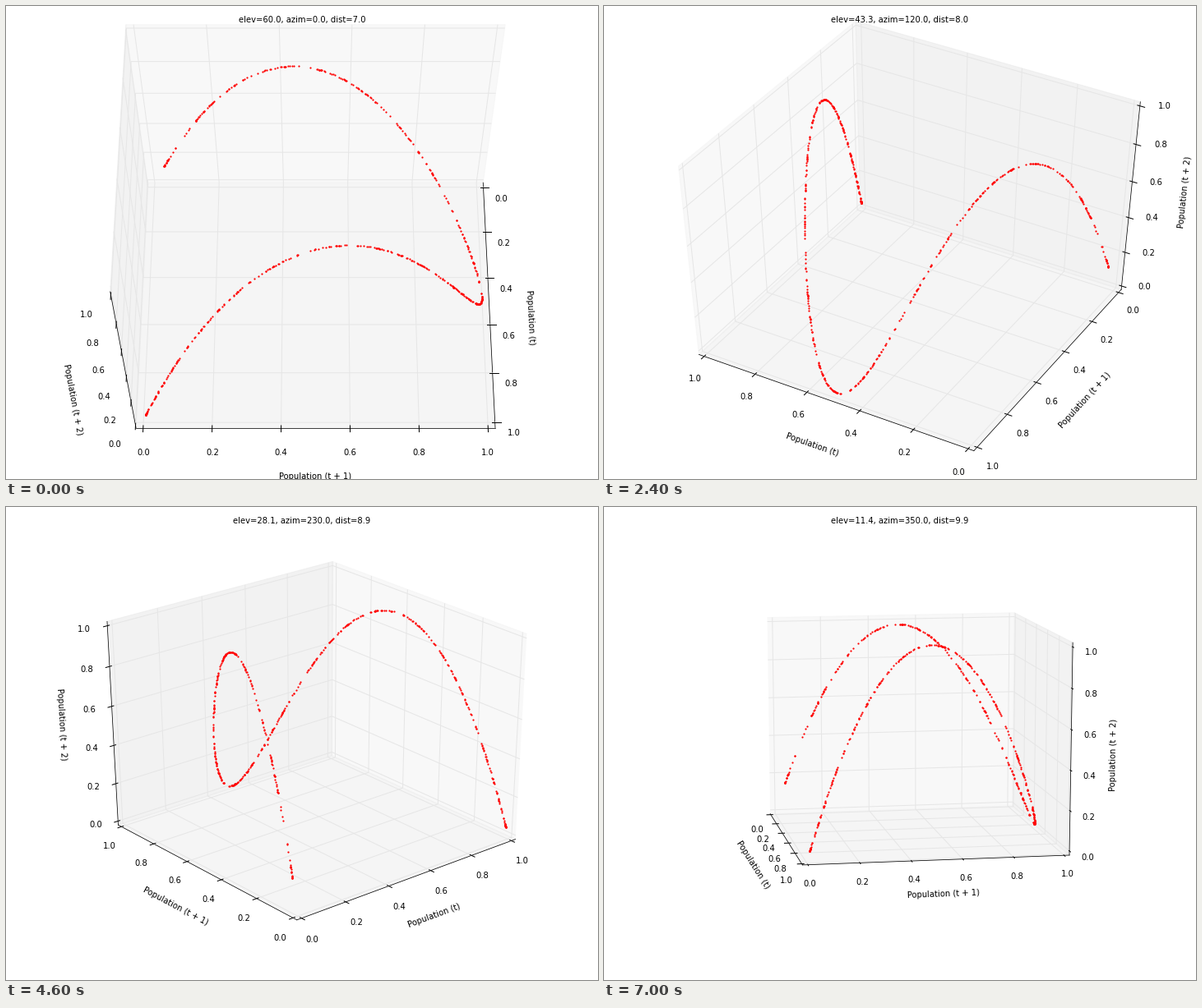
Write a matplotlib script that moves like this. It is 720x576 px and loops after 7200 ms.

```python
import numpy as np
import matplotlib.pyplot as plt
from matplotlib.animation import FuncAnimation
from matplotlib.collections import LineCollection
from matplotlib.patches import Polygon

FRAMES = 36
RATE = 3.99
POINTS = 500
TICKS = np.linspace(0, 1, 6)
STEP = 1 / 12                       # base unit for margins, ticks and label gaps
LOW, HIGH = -STEP / 4, 1 + STEP / 4
PANE_GREYS = (0.95, 0.90, 0.925)
NAMES = ("Population (t)", "Population (t + 1)", "Population (t + 2)")
TICK_DIRS = (1, 0, 0)
# axis flipped to the near side, for the x, y and z axis lines
NEAR_AXES = (1, 0, 0)

plt.rcParams.update({"font.family": "DejaVu Sans", "font.size": 10})


def logistic_orbit(count, rate, start=0.5):
    pops = [start]
    while len(pops) < count + 2:
        pops.append(pops[-1] * rate * (1 - pops[-1]))
    return np.column_stack([pops[:-2], pops[1:-1], pops[2:]])


class Camera:
    def __init__(self, elev, azim, dist):
        el, az = np.radians([elev, azim])
        self.dist = dist
        self.normal = np.array([np.cos(az) * np.cos(el),
                                np.sin(az) * np.cos(el), np.sin(el)])
        self.right = np.array([-np.sin(az), np.cos(az), 0])
        self.up = np.cross(self.normal, self.right)

    def project(self, points):
        rel = np.asarray(points, float) - 0.5
        depth = self.dist - rel @ self.normal
        return np.stack([rel @ self.right, rel @ self.up], -1) / depth[..., None]

    def far_corner(self):
        return np.where(self.normal < -1e-9, HIGH, LOW)


def flipped(point, i):
    out = point.copy()
    out[i] = LOW + HIGH - out[i]
    return out


def placed(point, i, value):
    out = point.copy()
    out[i] = value
    return out


def away_from_center(point, gap, axis):
    out = point + np.where(point < 0.5, -gap, gap)
    out[axis] = point[axis]
    return out


def upright(angle):
    angle = (angle + 180) % 180
    return angle - 180 if angle > 90 else angle


def draw_pane(cam, axis, far):
    a, b = [i for i in range(3) if i != axis]
    corners = np.empty((4, 3))
    corners[:, axis] = far[axis]
    corners[:, a] = LOW, HIGH, HIGH, LOW
    corners[:, b] = LOW, LOW, HIGH, HIGH
    grey = (PANE_GREYS[axis],) * 3
    ax.add_patch(Polygon(cam.project(corners), closed=False, facecolor=grey,
                         edgecolor=grey, alpha=0.5, lw=1, zorder=1,
                         clip_on=False))


def draw_line(ends, width, z):
    ax.plot(*ends.T, color="black", lw=width, zorder=z, clip_on=False)


def draw_axis(cam, axis, far):
    z = 2 + axis
    start = flipped(far, NEAR_AXES[axis])
    stop = flipped(start, axis)
    ends = cam.project([start, stop])
    draw_line(ends, 0.75, z)

    # axis title, turned along the axis line
    dx, dy = ax.transData.transform(ends[1]) - ax.transData.transform(ends[0])
    spot = away_from_center((start + stop) / 2, 1.6 * STEP, axis)
    ax.text(*cam.project(spot), NAMES[axis], ha="center", va="center",
            rotation=upright(np.degrees(np.arctan2(dy, dx))), zorder=z)

    grid = []
    for value in TICKS:
        bend = placed(far, axis, value)
        grid.append(cam.project([flipped(bend, (axis + 1) % 3), bend,
                                 flipped(bend, (axis + 2) % 3)]))
    ax.add_collection(LineCollection(grid, colors=[(0.9, 0.9, 0.9)],
                                     linewidths=1, zorder=z + 0.1,
                                     clip_on=False), autolim=False)

    side = TICK_DIRS[axis]
    sign = 1 if far[side] == HIGH else -1
    for value in TICKS:
        base = placed(start, axis, value)
        tick = [placed(base, side, base[side] + f * sign * STEP)
                for f in (0.1, -0.2)]
        draw_line(cam.project(tick), 1, z + 0.2)
        spot = away_from_center(base, 0.7 * STEP, axis)
        ax.text(*cam.project(spot), f"{value:.1f}", ha="center", va="top",
                zorder=z + 0.2)


def draw(frame):
    turn = frame / FRAMES
    elev, azim, dist = 60 - 50 * turn, 360 * turn, 7 + 3 * turn
    cam = Camera(elev, azim, dist)
    far = cam.far_corner()

    ax.cla()
    ax.set_axis_off()
    ax.set(xlim=(-0.095, 0.09), ylim=(-0.095, 0.09))
    for axis in range(3):
        draw_pane(cam, axis, far)
    for axis in range(3):
        draw_axis(cam, axis, far)
    ax.plot(*cam.project(orbit).T, "o", color="red", ms=2.2, mew=0,
            zorder=6, clip_on=False)
    title.set_text(f"elev={elev:.1f}, azim={azim:.1f}, dist={dist:.1f}")


orbit = logistic_orbit(POINTS, RATE)
fig = plt.figure(figsize=(10, 8), dpi=72, facecolor="white")
ax = fig.add_axes([0.125, 0.125, 0.775, 0.775])
title = fig.text(0.5, 0.98, "", ha="center", va="top")
anim = FuncAnimation(fig, draw, frames=FRAMES, interval=200, repeat=True)
plt.show()
```
